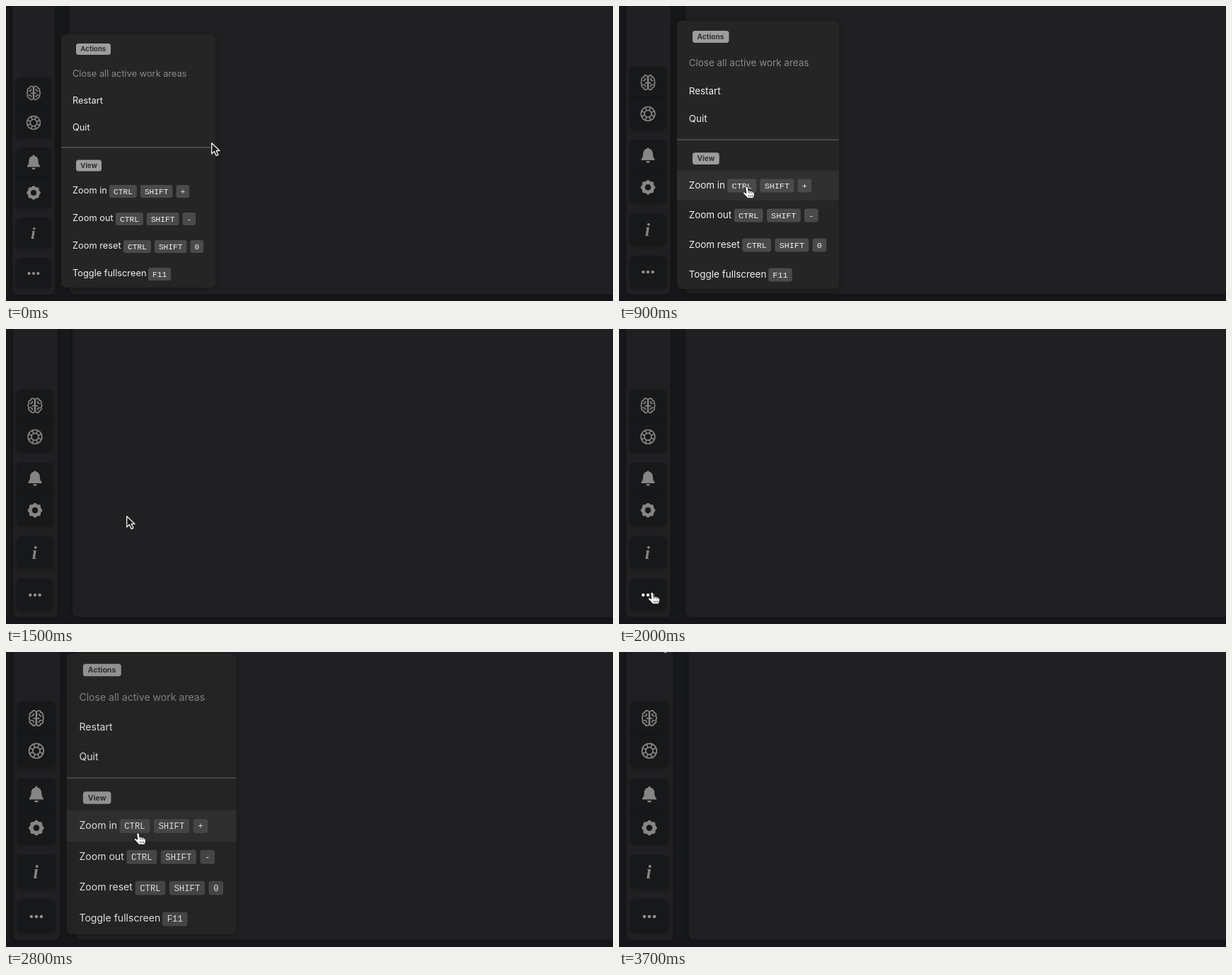
Recreate the animation shown at these times as an HTML page. Size 858 by 417 pixels, loop 3900 ms.

```html
<!DOCTYPE html>
<html lang="en">
<head>
<meta charset="utf-8">
<title>Zoom menu</title>
<style>
  html, body { margin: 0; width: 100%; height: 100%; overflow: hidden; background: #17181a; }
  svg { display: block; width: 858px; height: 417px; }
  text { font: 12.8px Inter, sans-serif; fill: #f0f0f0; white-space: pre; }
  .off { fill: #8a8a8a; }
  .tag { font-size: 9.6px; font-weight: 700; fill: #303031; }
  .key { font: 11.2px "Liberation Mono", monospace; }
  .info { font: italic 700 24px "Liberation Serif", serif; fill: #858585; }
  .btn { fill: #17181a; filter: drop-shadow(0 2px 2px rgba(0, 0, 0, .2)); }
  .panel { fill: #202022; filter: drop-shadow(0 0 2px rgba(0, 0, 0, .35)); }
  .box { fill: #252525; filter: drop-shadow(0 2px 4px rgba(0, 0, 0, .25)); }
  .line { fill: none; stroke: #858585; stroke-width: 1.6; stroke-linejoin: round; stroke-linecap: round; }
  .solid { fill: #858585; }
</style>
</head>
<body>
<svg id="stage" viewBox="0 0 858 417"></svg>
<script>
const LOOP = 3900, STEP = 100, FLOOR = 418;

// Vertical menu layout for each zoom level, in stage pixels
const zooms = [
  { s: 1,    top: 40, h: 358, tags: [61, 225.5], acts: [95.5, 133.5, 171.5], rule: 200, keys: 261, pitch: 39 },
  { s: 1.05, top: 21, h: 379, tags: [43.5, 215.7], acts: [80, 120, 159.3], rule: 189, keys: 253, pitch: 42 },
  { s: 1.1,  top: 2,  h: 397, tags: [25.5, 206], acts: [64, 106, 148], rule: 178, keys: 245, pitch: 43.8 }
];

const actions = ["Close all active work areas", "Restart", "Quit"];
const shortcuts = [
  ["Zoom in", 146, ["CTRL", "SHIFT", "+"]],
  ["Zoom out", 155, ["CTRL", "SHIFT", "-"]],
  ["Zoom reset", 166, ["CTRL", "SHIFT", "0"]],
  ["Toggle fullscreen", 201, ["F11"]]
];

// [step, value]
const zoomSteps = [[0, 0], [9, 1], [27, 2]];
const fadeSteps = [
  [0, 1], [10, .8], [11, .5], [12, .2], [13, 0],
  [21, .3], [22, .75], [23, 1],
  [28, .9], [29, .7], [30, .45], [31, .2], [32, 0]
];
// [step, x, y, shape, hovered item]
const pointerSteps = [
  [0, 290, 193, "arrow"], [1, 280, 199, "arrow"], [2, 256, 214, "arrow"], [3, 228, 231, "arrow"],
  [4, 203, 245, "hand", 0], [5, 187, 252, "hand", 0], [6, 180.5, 255, "hand", 0],
  [13, 180.5, 255, "arrow"], [15, 170, 264, "arrow"], [16, 145, 287, "arrow"], [17, 110, 315, "arrow"],
  [18, 78, 344, "arrow"], [19, 54, 364, "hand", "more"], [20, 46.5, 372, "hand", "more"],
  [21, 60, 366, "hand"], [22, 103, 335, "hand", 3], [23, 150, 298, "hand", 2],
  [24, 176.5, 267.5, "hand", 1], [25, 186.5, 255.5, "hand", 0],
  [31, 168, 190, "arrow"], [32, 128, 68, "arrow"], [33, 108, 45, "arrow"], [34, 92, 25, "arrow"],
  [35, 80, 8, "arrow"], [36, 68, -6, "arrow"], [37, 58, -18, "arrow"]
];

const rect = (x, y, w, h, r, attrs) =>
  `<rect x="${x}" y="${y}" width="${w}" height="${h}" rx="${r}" ${attrs}/>`;
const text = (x, y, str, cls = "") => `<text x="${x}" y="${y}" class="${cls}">${str}</text>`;
const icon = (y, body) => `<g transform="translate(39 ${y})">${body}</g>`;

function polar(count, fn) {
  return Array.from({ length: count }, (_, i) => fn(i / count * Math.PI * 2)).join("");
}

function brain() {
  const half = `<path class="line" d="M-.4-7.8a2.8 2.8 0 0 0-5.4.7a3 3 0 0 0-2.4 4.7a3.2 3.2 0 0 0 0 4.8a3 3 0 0 0 2.4 4.7a2.8 2.8 0 0 0 5.4.7z
    M-6-2.6q2.6-.6 2.6-2.8M-6.5 3q2.8-.6 3.2 2.4M-3.6.3h3"/>`;
  return half + `<g transform="scale(-1 1)">${half}</g>`;
}

function ring() {
  const spokes = polar(8, a => {
    const c = Math.cos(a + .39), s = Math.sin(a + .39);
    return `M${4.8 * c} ${4.8 * s}L${9.3 * c} ${9.3 * s}`;
  });
  return `<circle class="line" r="9.4"/><circle class="line" r="4.7"/><path class="line" d="${spokes}"/>`;
}

function gear() {
  const points = polar(96, a => {
    const r = 9.2 + .7 * Math.cos(8 * a);
    return `${r * Math.cos(a)},${r * Math.sin(a)} `;
  });
  return `<polygon class="solid" points="${points}"/><circle r="4" fill="#17181a"/>`;
}

const bell = `<path class="solid" d="M0-10.5c.9 0 1.4.6 1.4 1.5 3.3.7 5.2 3.3 5.2 6.7 0 4 1 5.6 2.4 7.2V6.5H-9V4.9
  c1.4-1.6 2.4-3.2 2.4-7.2 0-3.4 1.9-6 5.2-6.7 0-.9.5-1.5 1.4-1.5zM-2.6 7.8h5.2a2.6 2.4 0 0 1-5.2 0z"/>`;
const dots = [-6.4, 0, 6.4].map(x => `<circle cx="${x}" r="2.1"/>`).join("");

function sidebar(s) {
  const group = (y, h) => rect(14, y, 50, h, 7, 'class="btn"');
  const seam = y => rect(14, y, 50, 2, 0, 'fill="#000" opacity=".12"');
  return `<g transform="translate(0 ${FLOOR * (1 - s)}) scale(${s})">
    ${rect(89.5, -60, 900, 467.5, 7, 'class="panel"')}
    ${rect(9.4, -60, 60, 468, 7, 'class="panel"')}
    ${group(101, 85)}${seam(142)}${group(200, 85)}${seam(241)}${group(299, 43)}${group(356, 43)}
    ${icon(123, brain())}${icon(165, ring())}${icon(221, bell)}${icon(264, gear())}
    ${text(35, 329.3, "i", "info")}
    <g transform="translate(39 378)" class="more">${dots}</g>
  </g>`;
}

function keycaps(x, y, labels) {
  return labels.map(label => {
    const w = label.length * 6.72 + 12;
    const cap = rect(x, y - 9, w, 18, 3, 'fill="#4a4a4b"') + text(x + 6, y + 3.5, label, "key");
    x += w + 5;
    return cap;
  }).join("");
}

function menu(z) {
  const y = v => v / z.s;
  const tag = (v, w, label) =>
    rect(99, y(v) - 8, w, 16, 3.5, 'fill="#9d9d9e"') + text(105.3, y(v) + 3.3, label, "tag");
  const rows = shortcuts.map(([label, x, keys], i) => {
    const mid = y(z.keys + i * z.pitch);
    return text(94, mid + 4.3, label) + keycaps(x, mid + 1, keys);
  }).join("");
  return `<g class="menu" transform="scale(${z.s})">
    ${rect(78, y(z.top), 218, y(z.h), 7, 'class="box"')}
    ${rect(78, 0, 218, y(z.pitch), 0, 'class="hover" fill="#303031"')}
    ${tag(z.tags[0], 49, "Actions")}${tag(z.tags[1], 36, "View")}
    ${actions.map((label, i) => text(94, y(z.acts[i]) + 4.5, label, i ? "" : "off")).join("")}
    ${rect(78, y(z.rule) - 1, 218, 2, 0, 'fill="#484849"')}
    ${rows}
  </g>`;
}

const arrow = `<path d="M.7.8V16l3.7-3.4 2.7 6 2.8-1.3-2.7-5.8h4.8z" fill="#1a1a1b" stroke="#f4f4f4" stroke-width="1.3" stroke-linejoin="round"/>`;
const hand = `<path d="M-1.7 1.7a1.7 1.7 0 0 1 3.3-.3l1 5 1.5-.5 1.5.9 1.6-.2 1.3 1 1.3.1 1.1 1.5.2 3.4-1.2 2.4v1.8H1.5L-1 14l-3.7-3.7a1.4 1.4 0 0 1 2-2l1.8 1.3z"
  fill="#fff" stroke="#111" stroke-width="1" stroke-linejoin="round"/>
  <path d="M3 7l.5 3M6 7.3l.4 2.7M8.6 8.2l.3 2M3.2 12v3M5.6 12v3M8 12v3" stroke="#222" stroke-width=".8" fill="none"/>`;

const stage = document.getElementById("stage");
stage.innerHTML = rect(0, 0, 858, 417, 0, 'fill="#17181a"') +
  rect(0, 409, 858, 8, 0, 'fill="#17151a"') +
  zooms.map(z => `<g class="scene">${sidebar(z.s)}${menu(z)}</g>`).join("") +
  rect(857, 0, 1, 408, 0, 'fill="#1a1a1c"') +
  `<g id="pointer"><g id="arrow">${arrow}</g><g id="hand">${hand}</g></g>`;

const scenes = [...stage.querySelectorAll(".scene")].map(root => ({
  root,
  menu: root.querySelector(".menu"),
  hover: root.querySelector(".hover"),
  more: root.querySelector(".more")
}));
const pointer = document.getElementById("pointer");
const shapes = { arrow: document.getElementById("arrow"), hand: document.getElementById("hand") };

const at = (table, step) => table.findLast(row => row[0] <= step);
const show = (el, on) => el.style.display = on ? "" : "none";

function draw(step) {
  const level = at(zoomSteps, step)[1];
  const fade = at(fadeSteps, step)[1];
  const [, x, y, shape, item] = at(pointerSteps, step);
  const z = zooms[level], scene = scenes[level];
  const onRow = typeof item === "number";

  scenes.forEach((other, i) => show(other.root, i === level));
  show(scene.menu, fade > 0);
  scene.menu.style.opacity = fade;
  show(scene.hover, onRow);
  if (onRow) scene.hover.setAttribute("y", (z.keys - 19.3 * z.s + item * z.pitch) / z.s);
  scene.more.setAttribute("fill", item === "more" ? "#f2f2f2" : "#8f8f8f");
  pointer.setAttribute("transform", `translate(${x} ${y})`);
  for (const name in shapes) show(shapes[name], name === shape);
}

const start = performance.now();
let last = -1;
function tick() {
  const step = Math.floor((performance.now() - start) % LOOP / STEP);
  if (step !== last) draw(last = step);
  requestAnimationFrame(tick);
}
tick();
</script>
</body>
</html>
```
